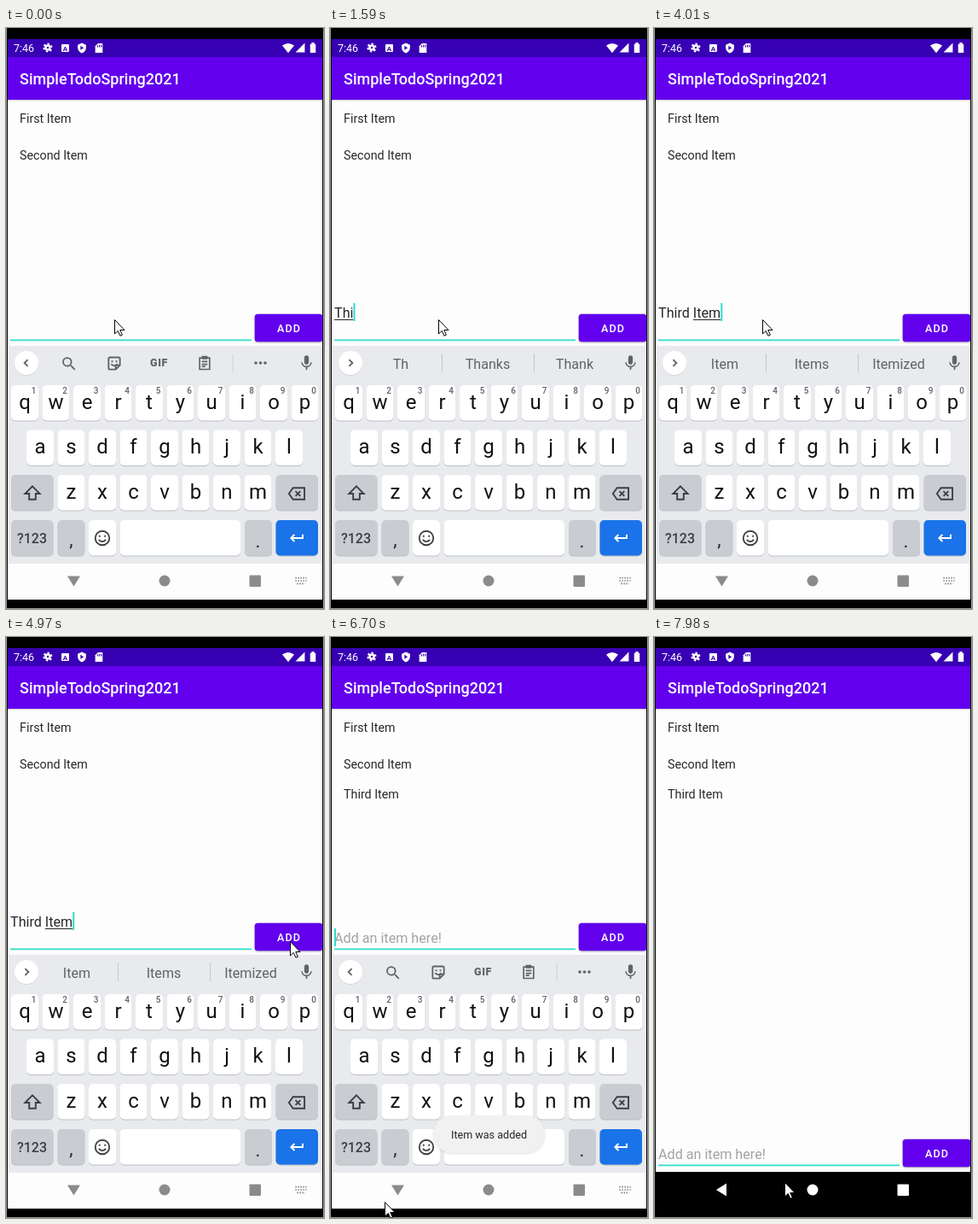
These frames come from a looping animation (373x680 px, 8000 ms). An HTML page with a canvas:

```html
<!DOCTYPE html>
<html lang="en">
<head>
<meta charset="utf-8">
<title>Todo list</title>
<style>
html, body { margin: 0; height: 100%; overflow: hidden; background: #000; }
canvas { display: block; }
</style>
</head>
<body>
<canvas id="stage" width="373" height="680"></canvas>
<script>
const LOOP = 8000, SUBMIT = 5340, DISMISS = 7310;
const screen = document.getElementById('stage').getContext('2d');
const board = Object.assign(document.createElement('canvas'), { width: 373, height: 680 });
const boardCtx = board.getContext('2d');
let c = screen;

const PURPLE = '#6200ee', TEAL = '#2fdccb', INK = '#262729', GREY = '#5f6368';

// Each entry: start time, typed text, index where the underlined word starts.
const typing = [
  [-630, '', 0], [1200, 'T', 0], [1450, 'Th', 0], [1590, 'Thi', 0], [1740, 'Thir', 0],
  [1980, 'Third', 0], [2400, 'Third ', 6], [2670, 'Third I', 6], [2950, 'Third It', 6],
  [3220, 'Third Ite', 6], [3870, 'Third Item', 6], [SUBMIT, '', 0]
];
const suggestions = [
  [0, null], [1330, 'T,The,This'], [1560, 'Th,Thanks,Thank'], [1740, 'Thi,This,Things'],
  [1860, 'Thir,Third,Thirty'], [2130, 'Third,Thirds,Thirdly'], [2530, 'one,time,party'],
  [2800, 'I,In,It'], [3090, 'It,Its,Items'], [3340, 'Ite,Item,Items'],
  [3990, 'Item,Items,Itemized'], [SUBMIT, null], [DISMISS, '']
];
const pointer = [
  [0, 127, 341], [4200, 127, 341], [4670, 323, 357], [4820, 332, 363], [4970, 333, 356],
  [5340, 334, 354], [5760, 334, 354], [6310, 72, 638], [6460, 66, 656], [6700, 64, 661],
  [6850, 64, 661], [7000, 73, 649], [7700, 73, 649], [7980, 153, 638], [LOOP, 153, 638]
];

const ICONS = {
  search: 'M15.5 14h-.79l-.28-.27A6.47 6.47 0 0 0 16 9.5 6.5 6.5 0 1 0 9.5 16c1.61 0 3.09-.59 4.23-1.57l.27.28v.79l5 4.99L20.49 19zm-6 0A4.5 4.5 0 1 1 14 9.5 4.5 4.5 0 0 1 9.5 14z',
  mic: 'M12 14c1.66 0 3-1.34 3-3V5a3 3 0 0 0-6 0v6c0 1.66 1.34 3 3 3zm5.3-3c0 3-2.54 5.1-5.3 5.1S6.7 14 6.7 11H5c0 3.41 2.72 6.23 6 6.72V21h2v-3.28c3.28-.48 6-3.3 6-6.72z',
  sticker: 'M6 3h12q2 0 2 2v9l-6 6H6q-2 0-2-2V5q0-2 2-2zM20 14h-4q-2 0-2 2v4M9 7.500v2.500M15 7.500v2.500M7.500 12.500q4.500 4 9 0',
  clipboard: 'M5 5h14v16H5zM9 3h6v3H9zM8 10h8M8 14h8M8 17h5',
  shift: 'M12 4l9 9h-5v7H8v-7H3z',
  backspace: 'M8 5h14v14H8L3 12zM11 9l6 6M17 9l-6 6',
  smile: 'M3 12a9 9 0 1 0 18 0a9 9 0 1 0-18 0M8.5 8.5v2M15.5 8.5v2M7.5 14q4.500 5 9 0',
  enter: 'M20 7v5H5M9 7.500L4.500 12l4.500 4.500',
  left: 'M14 7l-5 5 5 5', right: 'M10 7l5 5-5 5',
  hub: 'M7 12a5 5 0 1 0 10 0a5 5 0 1 0-10 0',
  teeth: 'M3 12a9 9 0 1 0 18 0a9 9 0 1 0-18 0',
  shield: 'M12 1L3 5v6c0 6 4 10 9 12 5-2 9-6 9-12V5z',
  play: 'M9 7l7 4.500-7 4.500z',
  card: 'M10 2h10v20H4V8z', cardPins: 'M9 6v4M13 5v5M17 5v5',
  wifi: 'M0 7q12-9 24 0L12 22z', signal: 'M22 2v20H2z',
  battery: 'M9 1h6v3h3v19H6V4h3z',
  keyboard: 'M2 7h20M2 12h20M5 17h14'
};
for (const name in ICONS) ICONS[name] = new Path2D(ICONS[name]);
const arrow = new Path2D('M.5 .5V17L4.300 13.400 7 19.300 9.400 18.200 6.800 12.500H12z');
const backArrow = new Path2D('M-6.500 0L5.500-7.500V7.500z');

const clamp = v => Math.max(0, Math.min(1, v));
const ramp = (t, a, b) => clamp((t - a) / (b - a));
const latest = (list, t) => list.findLast(e => e[0] <= t);

function pointerAt(t) {
  const i = pointer.findIndex(k => k[0] > t), [t0, x0, y0] = pointer[i - 1], [t1, x1, y1] = pointer[i];
  const p = ramp(t, t0, t1);
  return [Math.round(x0 + (x1 - x0) * p), Math.round(y0 + (y1 - y0) * p)];
}
function rect(x, y, w, h, color, r = 0) {
  c.fillStyle = color;
  c.beginPath();
  c.roundRect(x, y, w, h, r);
  c.fill();
}
function disc(x, y, r, color) { rect(x - r, y - r, 2 * r, 2 * r, color, r); }
function text(s, x, y, size, color, align = 'left', weight = 400, spacing = 0) {
  c.font = `${weight} ${size}px Roboto, sans-serif`;
  c.letterSpacing = `${spacing}px`;
  c.fillStyle = color;
  c.textAlign = align;
  c.fillText(s, x, y);
}
function shadow(color, blur, dy) {
  c.shadowColor = color;
  c.shadowBlur = blur;
  c.shadowOffsetY = dy;
}
const noShadow = () => shadow('transparent', 0, 0);

// Icons live on a 24-unit grid; without a line width they are filled.
function icon(name, x, y, size, color, line = 0, dash = []) {
  c.save();
  c.translate(x - size / 2, y - size / 2);
  c.scale(size / 24, size / 24);
  c.fillStyle = c.strokeStyle = color;
  c.lineWidth = line;
  c.setLineDash(dash);
  line ? c.stroke(ICONS[name]) : c.fill(ICONS[name]);
  c.restore();
}

function drawFrame() {
  rect(0, 0, 373, 680, '#9a9a9a');
  rect(1, 0, 371, 679, '#000');
  rect(2, 84, 369, 585, '#fdfdfd');
  rect(2, 84, 369, 1, '#dadada');
  rect(2, 85, 369, 1, '#f0f0f0');
}

function drawStatusAndTitle() {
  rect(2, 34, 369, 50, PURPLE);
  rect(2, 13, 369, 21, '#3700b3');
  text('7:46', 9, 28, 12.5, '#fff');
  icon('hub', 49, 23, 12, '#fff', 5);
  icon('teeth', 49, 23, 12, '#fff', 4, [4.7, 4.7]);
  rect(65, 19, 9, 9, '#fff', 1);
  text('A', 69.5, 26.500, 8, '#3700b3', 'center', 700);
  icon('shield', 89, 23.500, 13, '#fff');
  icon('play', 89, 23.500, 13, '#3700b3');
  icon('card', 109, 23.500, 13, '#fff');
  icon('cardPins', 109, 23.500, 13, '#3700b3', 2);
  icon('wifi', 331, 23.500, 14, '#fff');
  icon('signal', 345, 23, 13, '#fff');
  icon('battery', 360, 23, 13, '#fff');
  text('SimpleTodoSpring2021', 16, 66, 18.05, '#fff', 'left', 500);
}

function drawItems(t) {
  const size = 14.3;
  text('First Item', 16, 111, size, INK);
  text('Second Item', 16, 154, size, INK);
  if (t >= SUBMIT) text('Third Item', 16, 189, size, INK);
}

function drawField(t, dy) {
  const [since, typed, wordStart] = latest(typing, t);
  const caretOn = (t - since) % 1000 < 500;
  c.save();
  c.translate(0, dy);
  rect(5, 364.6, 283, 1.7, TEAL);
  text(typed, 5, 339, 16.15, INK);
  const end = 5 + c.measureText(typed).width;
  const from = 5 + c.measureText(typed.slice(0, wordStart)).width;
  rect(from, 341, end - from, 1, INK);
  if (t >= SUBMIT) text('Add an item here!', 5, 358, 16.15, '#a3a3a3');
  if (caretOn) rect(end, t >= SUBMIT ? 341 : 322, 2, 21, TEAL);

  shadow('rgba(0,0,0,.3)', 2, 1);
  rect(291.7, 334.7, 79.6, 32.6, PURPLE, 3.5);
  noShadow();
  if (t >= SUBMIT) rect(292, 335, 79, 32, `rgba(255,255,255,${.2 * (1 - ramp(t, SUBMIT, 5560))})`, 3.5);
  text('ADD', 332, 356, 12.6, '#fff', 'center', 500, 1.1);
  c.restore();
}

function key(x, y, w, color = '#fff') {
  rect(x, y + 1, w, 41.5, '#bcbfc4', 5);
  rect(x, y, w, 41.5, color, 5);
}
function letters(row, x, y, caps) {
  [...row].forEach((ch, i) => {
    const cx = x + i * 36.5;
    key(cx - 16, y, 32);
    text(caps ? ch.toUpperCase() : ch, cx, y + 27.5, 24, '#111', 'center');
    if (row.length === 10) text((i + 1) % 10, cx + 10.5, y + 10, 10, GREY, 'center', 500);
  });
}

function drawStrip(words) {
  disc(24, 393, 14, '#d5d7da');
  disc(24, 392, 14, '#fff');
  icon(words === null ? 'left' : 'right', 24, 392, 19, GREY, 2.3);
  icon('mic', 352.5, 392, 21, GREY);
  if (words === null) {
    icon('search', 74, 393, 21, GREY);
    icon('sticker', 127, 393, 20, GREY, 2.2);
    text('GIF', 179.5, 396, 12.5, GREY, 'center', 900, .6);
    icon('clipboard', 233, 392, 20, GREY, 2);
    rect(265.5, 382, 1, 21, '#cfd1d5');
    for (const x of [293, 298.5, 304]) disc(x, 392, 1.8, GREY);
  } else if (words) {
    words.split(',').forEach((w, i) => text(w, 83 + i * 102, 398.5, 16.1, GREY, 'center'));
    for (const x of [131, 239]) rect(x, 381, 1, 22, '#c4c7cb');
  }
}

function drawKeyboard(t) {
  const caps = t >= 1080 && t < 1330, side = '#c9ccd1', dark = '#3c4043';
  rect(2, 372, 369, 255, '#e8eaed');
  drawStrip(latest(suggestions, t)[1]);
  letters('qwertyuiop', 22, 418, caps);
  letters('asdfghjkl', 40, 470.5, caps);
  letters('zxcvbnm', 76.5, 523, caps);
  key(6, 523, 49.5, side);
  icon('shift', 31, 544, 23, dark, 2);
  if (caps) icon('shift', 31, 544, 23, dark);
  key(316.5, 523, 49.5, side);
  icon('backspace', 340.5, 545, 23, dark, 2);
  key(6, 576, 49.5, side);
  text('?123', 30.5, 603, 16, dark, 'center', 500);
  key(60.5, 576, 32, side);
  text(',', 76.5, 606, 22, INK, 'center');
  key(97, 576, 32);
  icon('smile', 113, 597, 22, dark, 2);
  key(133.5, 576, 141.5);
  key(280, 576, 32, side);
  text('.', 295.5, 608, 22, INK, 'center');
  key(316.5, 576, 49.5, '#1a73e8');
  icon('enter', 341, 597, 21, '#fff', 2.3);
}

function drawNavIcons(hidden) {
  const color = hidden > .5 ? '#fff' : '#8b8b8b';
  c.save();
  c.translate(79.5, 647);
  c.rotate(-Math.PI / 2 * (1 - hidden ** 2));
  c.fillStyle = color;
  c.fill(backArrow);
  c.restore();
  disc(186, 647, 6.5, color);
  rect(285.5, 640.5, 13.5, 13.5, color, 1);
  if (hidden < .5) icon('keyboard', 346, 647, 16, color, 2.5, [2.5, 2]);
}

function drawToast(t) {
  c.globalAlpha = ramp(t, 5480, 5760) * (1 - ramp(t, 7780, 7950));
  if (c.globalAlpha) {
    shadow('rgba(0,0,0,.13)', 3, 1);
    rect(121, 560, 131, 44, '#f1f1f1', 22);
    noShadow();
    text('Item was added', 186.5, 587, 12.57, INK, 'center');
  }
  c.globalAlpha = 1;
}

function drawPointer(t) {
  const [x, y] = pointerAt(t);
  c.save();
  c.translate(x, y);
  c.fillStyle = '#fff';
  c.strokeStyle = '#000';
  c.lineWidth = 1;
  c.fill(arrow);
  c.stroke(arrow);
  c.restore();
}

function draw(t) {
  const hidden = t < DISMISS ? 0 : t < 7430 ? .1 : t < 7580 ? .7 : 1;
  const dark = hidden > .5;
  c = boardCtx;
  c.clearRect(0, 0, 373, 680);
  drawKeyboard(t);

  c = screen;
  drawFrame();
  drawStatusAndTitle();
  drawItems(t);
  drawField(t, dark ? 253 : 0);
  rect(2, 626, 369, 43, dark ? '#000' : '#fdfdfd');

  c.save();
  c.beginPath();
  c.rect(2, 84, 369, 585);
  c.clip();
  c.globalAlpha = 1 - hidden;
  c.drawImage(board, 0, Math.round(138 * hidden));
  c.restore();

  drawToast(t);
  drawNavIcons(hidden);
  drawPointer(t);
}

const start = performance.now();
function tick() {
  draw((performance.now() - start) % LOOP);
  requestAnimationFrame(tick);
}
tick();
</script>
</body>
</html>
```
